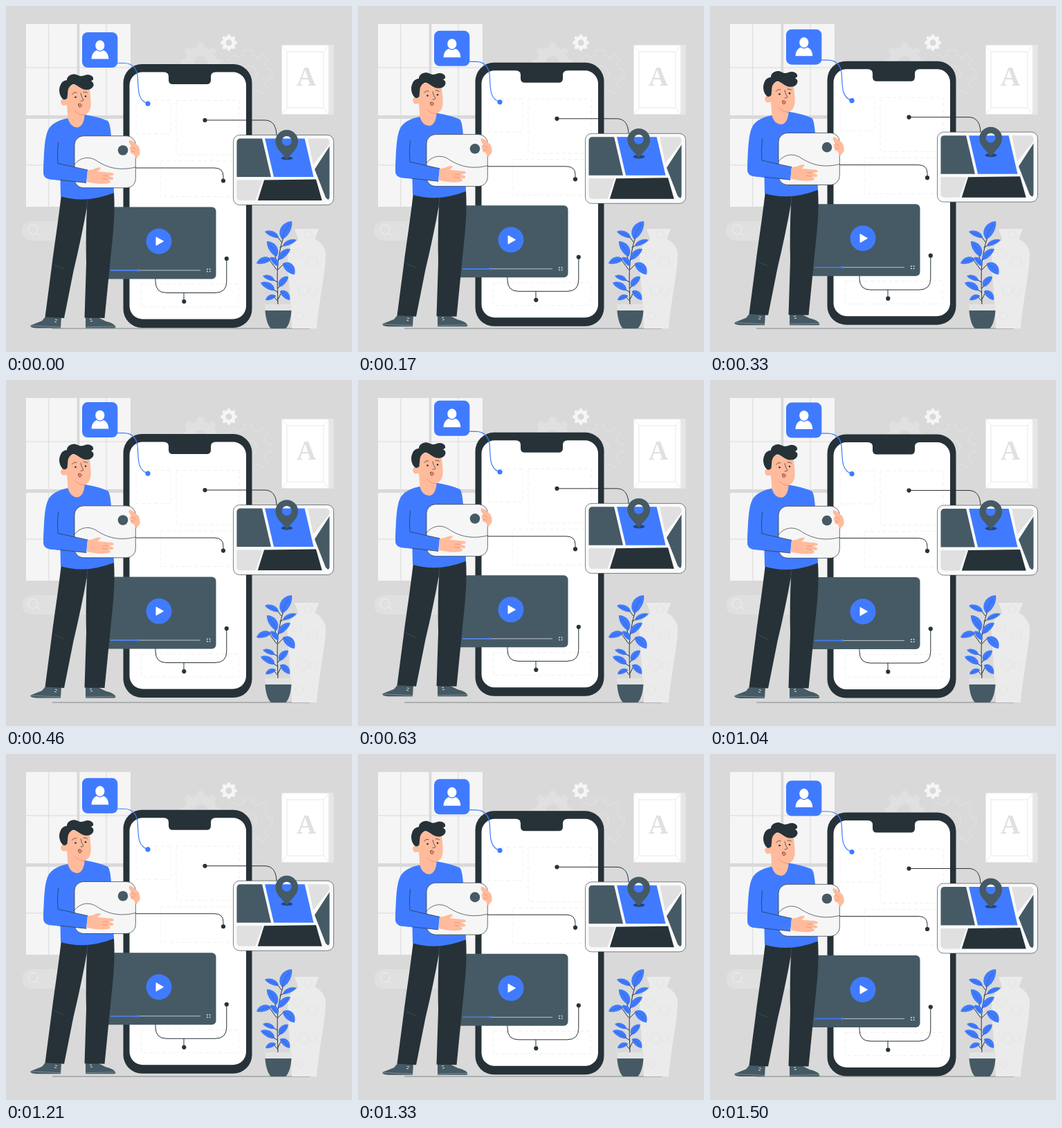
Recreate the animation shown at these times as an HTML page. Size 500x500 px, loop 1.54 s.

```html
<!DOCTYPE html>
<html lang="en">
<head>
<meta charset="utf-8">
<title>Building a mobile screen</title>
<style>
  html, body { margin: 0; width: 100%; height: 100%; overflow: hidden; background: #d9d9d9; }
  svg { display: block; width: 100%; height: 100%; }
  .line { fill: none; stroke: #263238; stroke-width: 1; stroke-linecap: round; }
  .thin { fill: none; stroke: #263238; stroke-width: .7; stroke-linecap: round; stroke-linejoin: round; }
  .dash { fill: none; stroke: #ebebeb; stroke-width: .8; stroke-dasharray: 5 4; }
  .ink { fill: #263238; }
  .slate { fill: #455a64; }
  .blue { fill: #407bff; }
  .skin { fill: #ffbb9c; }
  .pale { fill: none; stroke: #e0e0e0; stroke-width: .7; }
  .fold { fill: none; stroke: #f2825f; stroke-width: .7; }
</style>
</head>
<body>
<svg viewBox="0 0 500 500">
  <defs>
    <clipPath id="mapClip"><rect x="333.500" y="191.500" width="134" height="89.500" rx="5"/></clipPath>
  </defs>

  <g id="room">
    <g id="window" fill="#f5f5f5"></g>
    <rect x="23" y="311" width="127" height="28" rx="14" fill="#e0e0e0"/>
    <g fill="none" stroke="#f0f0f0" stroke-width="1">
      <circle cx="39" cy="323" r="7"/>
      <path d="M44 328l6 5"/>
    </g>
    <g id="gears"></g>

    <rect x="466" y="56" width="7.500" height="101" fill="#e6e6e6"/>
    <rect x="398" y="56" width="69" height="101" fill="#fff"/>
    <path class="pale" d="M398.500 56.500h68v100h-68zM406 66h53v81h-53zM398 56l8 10M467 56l-8 10M398 157l8-10M467 157l-8-10"/>
    <text x="434" y="115" text-anchor="middle" font-family="'Liberation Serif', serif" font-weight="700" font-size="39" fill="#e0e0e0">A</text>

    <path d="M67 466H439" stroke="#7f8588" stroke-width="1"/>
    <path d="M417 322H452C450 329 447 333 447 337C455 341 462 349 462 360C462 382 452 428 449 466H413C412 425 407 390 407 362C407 350 413 342 422 338C422 333 419 329 417 322Z" fill="#ebebeb"/>
    <g id="hexes" class="pale"></g>

    <path class="line" d="M393 432C392 400 391 374 395 358Q397 345 402 331M391 381L380 366M394 367L403 358M393 381L402 372M392 399L384 394M393 408L399 400M393 414L384 408M393 424L398 414M393 427L387 420M392 374L388 358M396 349L403 345M398 341L392 333" stroke-width=".8"/>
    <g id="leaves"></g>
    <path d="M374.500 431H413L412 441H375Z" fill="#e3e3e3"/>
    <path class="slate" d="M374.500 440H412.500C412 450 409 462 404 466H383C378 462 375 450 374.500 440Z"/>
  </g>

  <g id="float">
    <!-- phone -->
    <rect class="ink" x="169.500" y="84" width="186" height="381" rx="27"/>
    <path d="M197 95.500H228Q235 95.500 235 102V107Q235 113 241 113H290Q296 113 296 107V102Q296 95.500 303 95.500H328A19 19 0 0 1 347 114.500V433.500A19 19 0 0 1 328 452.500H197.500A19 19 0 0 1 178.500 433.500V114.500A19 19 0 0 1 197.500 95.500Z" fill="#fff"/>
    <path class="dash" d="M188 136.500H238V184.500H188ZM246 136.500H337V215H246ZM223 224H337V275.500H223ZM195.500 402H336V435H195.500Z"/>

    <!-- connectors -->
    <path class="line" d="M161 82.500H170C183 82.500 190 90 190.500 106C191 122 191 137 205 141" style="stroke:#407bff;stroke-width:1.200"/>
    <circle class="blue" cx="205" cy="141" r="3.600"/>
    <path class="line" d="M288 165H374C385 165 391 173 391 188M187 234H301Q314 234 314 246V252M216 394V398Q216 414.500 232 414.500H302Q318.800 414.500 318.800 398V365M257 414.500V427"/>
    <g class="ink">
      <circle cx="287.500" cy="165" r="3.100"/><circle cx="314" cy="252.500" r="3.100"/>
      <circle cx="318.800" cy="365" r="3.100"/><circle cx="257.300" cy="427" r="3.100"/>
    </g>

    <!-- profile badge -->
    <rect class="blue" x="110" y="38" width="51.300" height="51" rx="8"/>
    <g fill="#fff">
      <ellipse cx="135.800" cy="57" rx="6.600" ry="7.400"/>
      <path d="M123.500 76.500C124 68 128 65.500 131 64Q136 67.500 141 64C144 65.500 148 68 148.300 76.500Z"/>
    </g>

    <!-- video -->
    <rect class="slate" x="130" y="290.500" width="173.500" height="104" rx="6"/>
    <circle class="blue" cx="221" cy="340" r="18.500"/>
    <path d="M217 334L227.500 340L217 346Z" fill="#fff" stroke="#fff" stroke-linejoin="round"/>
    <path d="M151 382H281" stroke="#bcc4c8" stroke-width="1"/>
    <path d="M151 382H191" stroke="#407bff" stroke-width="1.400"/>
    <circle class="blue" cx="191" cy="382" r="2"/>
    <path d="M290.500 381.300V380H292M293.500 380H295V381.300M295 382.700V384H293.500M292 384H290.500V382.700" fill="none" stroke="#fff" stroke-width=".9"/>

    <!-- map -->
    <rect x="328.500" y="186.500" width="145" height="101" rx="9" fill="#fafafa" stroke="#263238" stroke-width=".6"/>
    <g clip-path="url(#mapClip)">
      <path class="slate" d="M333 191H370L383 247H333ZM468 202L446 236L462 277L468 282Z"/>
      <path class="blue" d="M374 191H431.500L444.500 247H387Z"/>
      <path d="M436 191H468V199L444 229ZM333 251.500H371L360 282H333Z" fill="#e0e0e0"/>
      <path class="ink" d="M373 251.500L448 250.500L457 282H363.500Z"/>
    </g>
    <ellipse cx="406" cy="220" rx="8.500" ry="2.600" fill="#26457f"/>
    <path class="slate" fill-rule="evenodd" d="M405.700 222C400 213 389.300 207 389.300 195.500A16.400 16.400 0 0 1 422.100 195.500C422.100 207 411.500 213 405.700 222ZM398.700 195a7 7 0 1 0 14 0a7 7 0 1 0 -14 0Z"/>

    <!-- legs and shoes -->
    <path class="slate" d="M57 449H80L79 465.500H44Q34 465 35.500 461.500L52 455ZM115 449H131L144 455.500Q158 459 158.500 464L157 465.500H115Z"/>
    <path d="M36 462L79 464M115 464L158 463" fill="none" stroke="#8b989e" stroke-width=".8"/>
    <path d="M71 453l3 1M70 456l3 1M121 453l3-1M122 456l3-1" stroke="#dfe5e8" stroke-width="1"/>
    <path class="ink" d="M80 272C75 315 70 345 66 377L56.500 449.500L84 451L97.500 383Q109 335 117 290Q115 330 116 372L113.500 450.500L142.500 451L153 345Q158 300 156 270Z"/>
    <path d="M70 374Q77 378 84 380M118 279L116.500 294" fill="none" stroke="#48545a" stroke-width=".7"/>

    <!-- torso and head -->
    <path class="blue" d="M90 162C79 164 67 169 62 177C55 189 55 214 54 240Q54 249 63 250L78.500 252L79 275Q115 286 156 270L154 210L152 188C151 177 150 169 147 166Q133 160 114 157Z"/>
    <path class="skin" d="M88 144L89.500 163Q93 175 103 175.500Q112 174 113.500 159L110 150Z"/>
    <path class="skin" d="M88 115L118 112Q122 122 122.500 137Q124 155 112 158Q100 158 91 147L87 143Q80 146 79 138Q80 133 87 133Z"/>
    <path class="ink" d="M83 135C78 132 75.500 122 78 116Q80 108 88 107C88 100 97 96 104 100C111 104 115 97 122 100Q127 102 126 106.500L123 108.500Q128 111 126 116Q123 121.500 116 121C108 121 103 113 97 113Q91 115 89.500 122L88.500 133Q86 136 83 135Z"/>
    <circle class="ink" cx="100.500" cy="131.700" r="1.300"/>
    <circle class="ink" cx="115" cy="130.500" r="1.300"/>
    <path class="thin" d="M95.500 127.500Q98 124 102 125M112 124.500Q115 123.500 117.500 125.500M108 126Q109 132 112 136Q110 138 108 137.300"/>
    <path d="M104.500 141.500Q108 140 109.500 143.500Q107 148 105 145Z" fill="#ff8d68" stroke="#3d3030" stroke-width=".7"/>
    <path class="fold" d="M99.500 151Q105 158 113 157.500" stroke-width="1.300"/>

    <!-- held picture card -->
    <rect x="99" y="187.800" width="88.300" height="75" rx="13" fill="#f6f6f6" stroke="#263238" stroke-width=".7"/>
    <path class="thin" d="M99 229C106 220 118 216 130 223C145 233 162 239 187 233"/>
    <circle class="slate" cx="169" cy="208.500" r="7.300"/>
    <path class="skin" d="M178 194Q180 193 184 196L191 202Q194 206 193.500 214L188 221L184.500 214Q180 214 180 210L178.500 205Q180 203 181 203L177.500 197Z"/>
    <path class="fold" d="M181 203L187 207M181 209L186 211"/>

    <!-- near arm -->
    <path class="blue" d="M55 222Q62 225 75 227.500L118 237L116 255.500L63 250.500Q54 249 54 240Z"/>
    <path class="thin" d="M75.500 197Q73.500 213 75 227.500L118 237M79 251.500L116 255.500"/>
    <path class="skin" d="M118 237.500L126 236Q132 232.500 136.500 233.500Q137 236 132 239L153 241Q157 242 155 244.500L148 245.500L154 247.500Q157 250 153 251.500L147 250.500L151 253Q151 256 146 256.500Q134 258 116.500 254Z"/>
    <path class="fold" d="M140 245.300L148 245.500M139 249.500L147 250.500"/>
  </g>
</svg>

<script>
const NS = 'http://www.w3.org/2000/svg';
const add = (id, tag, attrs) => {
  const el = document.createElementNS(NS, tag);
  for (const k in attrs) el.setAttribute(k, attrs[k]);
  document.getElementById(id).append(el);
};

// Window panes: [start, size] along each axis
const cols = [[29, 32.3], [62.3, 40.2], [106.3, 38.2], [145.5, 34.5]];
const rows = [[26, 62.5], [89.5, 68.5], [163, 66.5], [230.5, 59.5]];
for (const [x, width] of cols)
  for (const [y, height] of rows) add('window', 'rect', { x, y, width, height });

const polar = (cx, cy, r, a) =>
  (cx + r * Math.cos(a)).toFixed(2) + ' ' + (cy + r * Math.sin(a)).toFixed(2);

function gear(cx, cy, r, hole, teeth, style) {
  const pts = [], step = 2 * Math.PI / teeth;
  for (let i = 0; i < teeth; i++)
    for (const [k, s] of [[-.3, .8], [-.19, 1], [.19, 1], [.3, .8]])
      pts.push(polar(cx, cy, r * s, (i + k) * step - Math.PI / 2));
  const ring = `M${cx - hole} ${cy}a${hole} ${hole} 0 1 0 ${2 * hole} 0a${hole} ${hole} 0 1 0 ${-2 * hole} 0Z`;
  add('gears', 'path', { d: `M${pts.join('L')}Z${ring}`, 'fill-rule': 'evenodd', ...style });
}
gear(281, 82, 29, 10, 8, { fill: '#e0e0e0' });
gear(322, 53, 12, 4.5, 8, { fill: '#f5f5f5' });
gear(350, 98, 35, 12, 8, { fill: 'none', stroke: '#e6e6e6', 'stroke-width': .8 });

for (const [x, y, r] of [[437, 331, 6], [443, 369, 8], [421, 358, 7], [430, 411, 8], [444, 412, 6], [424, 448, 6]]) {
  const pts = Array.from({ length: 6 }, (_, i) => polar(x, y, r, i * Math.PI / 3 + .5));
  add('hexes', 'path', { d: `M${pts.join('L')}Z` });
}

// Leaf from base to tip, arching upwards: the upper side bulges more
function leaf(x, y, tx, ty, w) {
  const dx = tx - x, dy = ty - y, len = Math.hypot(dx, dy);
  const up = dx < 0 ? w : -w;
  const nx = -dy / len * up, ny = dx / len * up;
  const at = (k, s) => `${x + dx * k + nx * s} ${y + dy * k + ny * s}`;
  add('leaves', 'path', {
    class: 'blue',
    d: `M${x} ${y}C${at(.15, 1.4)} ${at(.75, 1.4)} ${tx} ${ty}C${at(.75, -.7)} ${at(.2, -.7)} ${x} ${y}Z`
  });
  add('leaves', 'path', { class: 'thin', 'stroke-opacity': .35, d: `M${x} ${y}Q${at(.4, .35)} ${at(.8, .15)}` });
}
[
  [399, 337, 413, 311, 9], [394, 335, 374, 326, 5], [400, 347, 420, 338, 4.5],
  [391, 362, 377, 340, 7.5], [394, 367, 411, 351, 6], [383, 366, 362, 372, 6],
  [393, 376, 382, 363, 5], [400, 372, 417, 388, 8], [388, 397, 371, 390, 4.5],
  [395, 406, 408, 391, 6], [388, 411, 368, 400, 6], [390, 419, 375, 425, 4.5],
  [396, 412, 410, 425, 6]
].forEach(a => leaf(...a));

// Linear bob: 10 px up and back, advanced in even ticks
const LOOP = 1540, TICKS = 37, RISE = 10;
const float = document.getElementById('float');
function draw(now) {
  const tick = Math.floor((now % LOOP + 3) / LOOP * TICKS);
  const phase = (tick + 1) / TICKS % 1;
  const lift = RISE * (1 - Math.abs(1 - 2 * phase));
  float.setAttribute('transform', `translate(0 ${(.52 - lift).toFixed(3)})`);
}
function loop() {
  draw(performance.now());
  requestAnimationFrame(loop);
}
loop();
</script>
</body>
</html>
```
